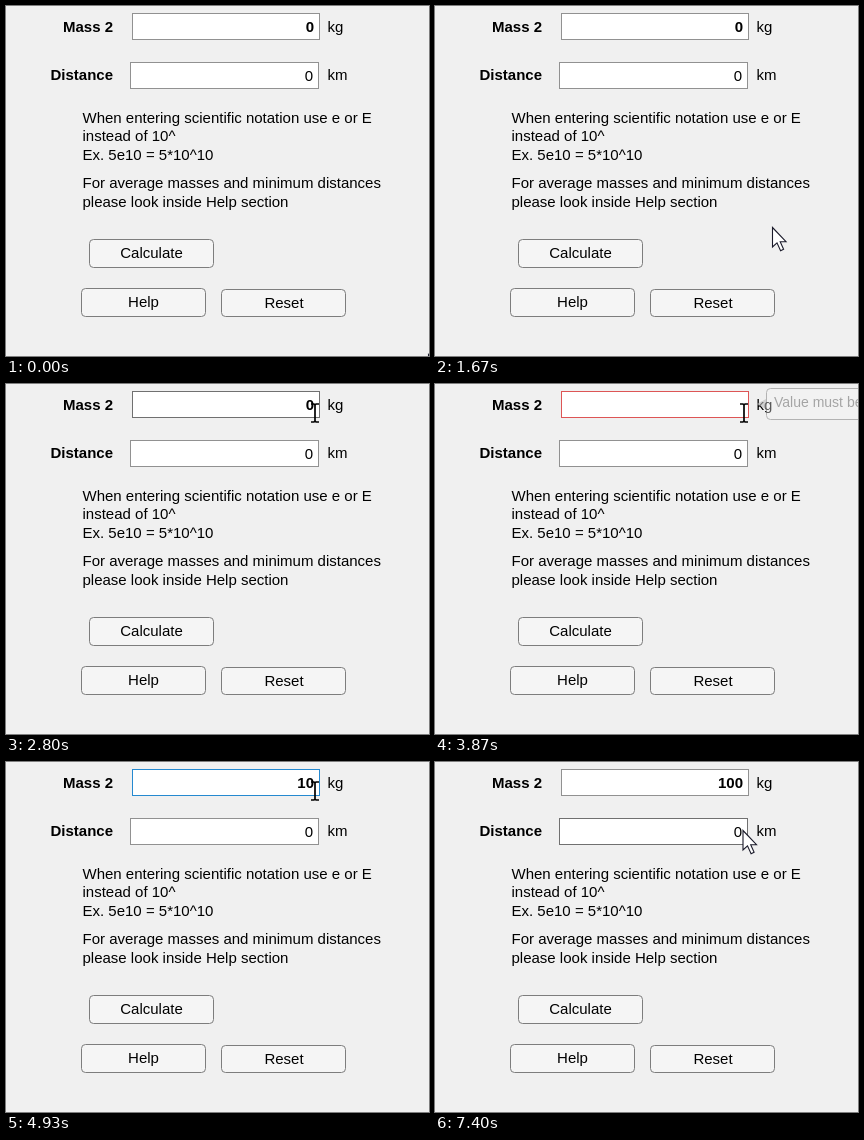
These frames come from a looping animation (423 px wide and 350 px high, 8000 ms). An HTML page:

```html
<!DOCTYPE html>
<html lang="en">
<head>
<meta charset="utf-8">
<title>Mass and distance form</title>
<style>
  html, body { margin: 0; width: 100%; height: 100%; overflow: hidden; background: #f0f0f0; }
  svg { display: block; width: 423px; height: 350px; }
  text { font: 15px "Liberation Sans", Arial, sans-serif; fill: #000; white-space: pre; }
  .bold { font-weight: bold; }
  .end { text-anchor: end; }
  .mid { text-anchor: middle; }
  .field { fill: #fff; shape-rendering: crispEdges; }
  .button { fill: #f5f5f5; stroke: #7d7d7d; }
  #tip text { font-size: 14px; fill: #737373; }
</style>
</head>
<body>
<svg viewBox="0 0 423 350">
  <rect width="423" height="350" fill="#f0f0f0"/>

  <text class="bold end" x="107" y="26">Mass 2</text>
  <rect id="mass" class="field" x="126.5" y="7.5" width="187" height="26"/>
  <text id="massText" class="bold end" x="308" y="26">0</text>
  <rect id="caret" x="306" y="12" width="1" height="17"/>
  <text x="321.5" y="26">kg</text>

  <text class="bold end" x="107" y="74">Distance</text>
  <rect id="dist" class="field" x="124.5" y="56.5" width="188" height="26"/>
  <text class="end" x="307" y="75">0</text>
  <text x="321.5" y="74">km</text>

  <text x="76.5" y="117">When entering scientific notation use e or E</text>
  <text x="76.5" y="135">instead of 10^</text>
  <text x="76.5" y="154">Ex. 5e10 = 5*10^10</text>
  <text x="76.5" y="182">For average masses and minimum distances</text>
  <text x="76.5" y="201">please look inside Help section</text>

  <rect class="button" x="83.5" y="233.5" width="124" height="28" rx="4"/>
  <text class="mid" x="145.5" y="252">Calculate</text>
  <rect class="button" x="75.5" y="282.5" width="124" height="28" rx="4"/>
  <text class="mid" x="137.5" y="301">Help</text>
  <rect class="button" x="215.5" y="283.5" width="124" height="27" rx="4"/>
  <text class="mid" x="278" y="302">Reset</text>

  <g id="tip">
    <path d="M331 15L321.5 20L331 25Z" fill="#bbb"/>
    <rect x="331.5" y="4.5" width="200" height="31" rx="4" fill="#f7f7f7" fill-opacity=".6" stroke="#8c8c8c"/>
    <text x="339" y="23">Value must be numeric</text>
  </g>

  <path id="arrow" d="M.5 .5V20L5 15.8L8.6 23.7L11.6 22.3L8.2 14.7H14Z" fill="#fff" stroke="#1a1a2a" stroke-width="1.1"/>
  <path id="beam" d="M-4 -9H-1L0 -8L1 -9H4M0 -8V8M-4 9H-1L0 8L1 9H4" fill="none" stroke="#000" stroke-width="1.7"/>
</svg>
<script>
const FPS = 15, LOOP = 8000;
const $ = id => document.getElementById(id);
const [mass, massText, caret, dist, tip, arrow, beam] =
  ["mass", "massText", "caret", "dist", "tip", "arrow", "beam"].map($);
const GREY = "#919191", HOVER = "#707070", BLUE = "#2589d0", RED = "#dd5555";

// Pointer stops: tick, x, y
const path = [
  [18, 422, 348], [25, 337, 221], [28, 318, 130], [31, 305, 63], [33, 302, 46],
  [38, 309, 32], [40, 309, 31], [42, 309, 29], [97, 309, 29], [100, 309, 51], [103, 307.5, 68]
];
const fade = [[57, 0.25], [58, 0.6], [59, 0.85], [60, 1], [62, 0.75], [63, 0.45], [64, 0.2], [65, 0]];
const typed = [[0, "0"], [57, ""], [62, "1"], [66, "10"], [87, "100"]];
const caretOn = [[46, 54], [62, 74], [82, 95], [103, 108]];

const within = (n, a, b) => n >= a && n < b;

// Latest value whose tick has been reached
function step(list, n, start) {
  let value = start;
  for (const [at, v] of list) if (n >= at) value = v;
  return value;
}

function pointerAt(n) {
  if (n <= path[0][0]) return path[0].slice(1);
  for (let i = 1; i < path.length; i++) {
    const [a, ax, ay] = path[i - 1], [b, bx, by] = path[i];
    if (n <= b) {
      const k = (n - a) / (b - a);
      return [ax + (bx - ax) * k, ay + (by - ay) * k];
    }
  }
  return path[path.length - 1].slice(1);
}

function show(el, on) {
  el.style.display = on ? "" : "none";
}

function draw(ms) {
  const n = Math.floor((ms + 6) * FPS / 1000);
  const [x, y] = pointerAt(n);
  const overMass = within(y, 7, 34) && within(x, 126, 314);
  const overDist = within(y, 56, 83) && within(x, 124, 313);

  mass.style.stroke = within(n, 57, 62) ? RED
    : within(n, 46, 108) ? BLUE : overMass ? HOVER : GREY;
  dist.style.stroke = within(n, 108, 111) ? BLUE : overDist ? HOVER : GREY;
  massText.textContent = step(typed, n, "0");
  show(caret, caretOn.some(([a, b]) => within(n, a, b)));
  tip.style.opacity = step(fade, n, 0);

  show(arrow, !overMass);
  show(beam, overMass);
  const place = `translate(${x} ${y})`;
  arrow.setAttribute("transform", place);
  beam.setAttribute("transform", place);
}

const start = performance.now();
function tick() {
  draw((performance.now() - start) % LOOP);
  requestAnimationFrame(tick);
}
tick();
</script>
</body>
</html>
```
